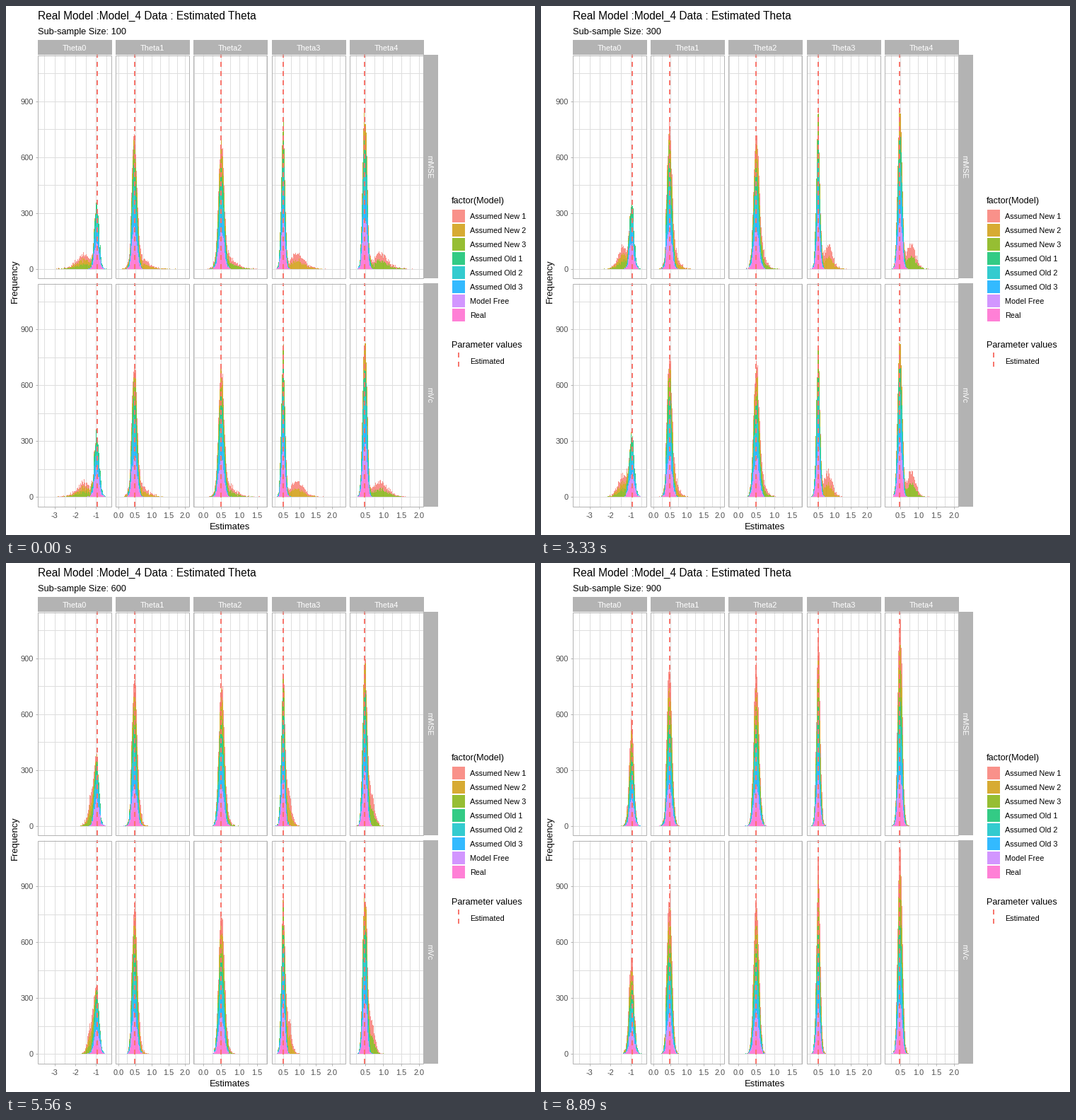
A matplotlib script for the animation above (10 s loop, 748 px wide and 748 px high).

```python
import numpy as np
import matplotlib.pyplot as plt
from matplotlib.animation import FuncAnimation
from matplotlib.patches import Rectangle

rng = np.random.default_rng(7)

SIZE = 748
PX = 0.72  # points per pixel at 100 dpi
GREY, GRID = "#B3B3B3", "#DEDEDE"
HUES = ["#F8766D", "#CD9600", "#7CAE00", "#00BE67",
        "#00BFC4", "#00A9FF", "#C77CFF", "#FF61CC"]
MODELS = ["Assumed New 1", "Assumed New 2", "Assumed New 3", "Assumed Old 1",
          "Assumed Old 2", "Assumed Old 3", "Model Free", "Real"]
SIZES = range(100, 1000, 100)
BIN = 0.02

# Offset and spread of the biased models for each sub-sample size
SHIFT = [0.46, 0.375, 0.32, 0.28, 0.225, 0.175, 0.12, 0.07, 0.025]
SPREAD = [0.20, 0.145, 0.122, 0.107, 0.098, 0.090, 0.080, 0.068, 0.058]

# left, zero, unit: pixels; sds: one per row; biased: models that drift
PANELS = [
    dict(left=45, zero=156.9, unit=29.4, ticks=(-3, -2, -1), step=1, line=129,
         mean=-0.97, sds=(0.113, 0.122), shift=-1.5, spread=1.7, biased=(0, 1, 2)),
    dict(left=155, zero=159, unit=47.2, ticks=(0, 0.5, 1, 1.5, 2), step=0.5, line=182,
         mean=0.48, sds=(0.073, 0.074), shift=0.35, spread=1.1, biased=(0, 1)),
    dict(left=265, zero=279, unit=50.6, ticks=(0, 0.5, 1, 1.5), step=0.5, line=304,
         mean=0.50, sds=(0.075, 0.075), shift=0.35, spread=1.1, biased=(0, 2)),
    dict(left=376, zero=369, unit=46, ticks=(0.5, 1, 1.5, 2), step=0.5, line=392,
         mean=0.50, sds=(0.0565, 0.0565), shift=1, spread=1, biased=(0, 1)),
    dict(left=486, zero=482.6, unit=50.8, ticks=(0.5, 1, 1.5, 2), step=0.5, line=507.5,
         mean=0.49, sds=(0.0565, 0.0565), shift=1, spread=1, biased=(0, 2)),
]
WIDTH, HEIGHT = 104, 316
ROWS = [("mMSE", 69, 371.5), ("mVc", 392, 694)]  # name, top, zero line
COUNT_PX = 79 / 300

fig = plt.figure(figsize=(SIZE / 100, SIZE / 100), dpi=100, facecolor="white")
ax = fig.add_axes([0, 0, 1, 1])
ax.set(xlim=(0, SIZE), ylim=(SIZE, 0), autoscale_on=False)
ax.axis("off")


def text(x, y, s, px, color="black", ha="left", **kw):
    kw.setdefault("va", "baseline")
    return ax.text(x, y, s, fontsize=px * PX, color=color, ha=ha,
                   family="Liberation Sans", zorder=6, **kw)


def box(x, y, w, h, fill="none", edge="none", z=1, **kw):
    ax.add_patch(Rectangle((x, y), w, h, facecolor=fill, edgecolor=edge,
                           lw=PX if edge != "none" else 0, zorder=z, **kw))


def line(xs, ys, color, px=1, z=1, **kw):
    ax.plot(xs, ys, color=color, lw=px * PX, zorder=z,
            solid_capstyle="butt", dash_capstyle="butt", **kw)


def dashed(x, bottom, top):
    line([x, x], [bottom, top], HUES[0], 2, 4, ls=(0, (3.5, 3)))


def draw_panel(p, top, zero):
    left, right, bottom = p["left"], p["left"] + WIDTH, top + HEIGHT
    for count in range(0, 1100, 150):
        y = zero - count * COUNT_PX
        line([left, right], [y, y], GRID)
    half = p["step"] / 2
    first = np.ceil((left - p["zero"]) / p["unit"] / half)
    last = np.floor((right - p["zero"]) / p["unit"] / half)
    for k in np.arange(first, last + 1):
        x = p["zero"] + k * half * p["unit"]
        line([x, x], [top, bottom], GRID)
    dashed(p["line"], bottom, top)
    box(left + 0.5, top + 0.5, WIDTH, HEIGHT - 1, edge=GREY, z=5)


def draw_static():
    text(45, 19, "Real Model :Model_4 Data : Estimated Theta", 15.5)
    text(317, 740, "Estimates", 13, ha="center")
    text(13, 389, "Frequency", 13, ha="center", va="center", rotation=90)

    for i, p in enumerate(PANELS):
        box(p["left"], 48, WIDTH + 1, 21, GREY)
        text(p["left"] + WIDTH / 2, 63, f"Theta{i}", 11, "white", "center")
        for t in p["ticks"]:
            x = p["zero"] + t * p["unit"]
            line([x, x], [708, 711], GREY)
            text(x, 724, f"{t:g}" if i == 0 else f"{t:.1f}", 11, "#4D4D4D", "center")
        for _, top, zero in ROWS:
            draw_panel(p, top, zero)

    for name, top, zero in ROWS:
        box(590, top, 21, HEIGHT, GREY)
        text(598, top + HEIGHT / 2, name, 11, "white", "center",
             va="center", rotation=270)
        for count in range(0, 1000, 300):
            y = zero - count * COUNT_PX
            line([42, 45], [y, y], GREY)
            text(39, y + 4, str(count), 11, "#4D4D4D", "right")

    text(630, 279, "factor(Model)", 12.8)
    for i, (name, hue) in enumerate(zip(MODELS, HUES)):
        y = 297 + 20 * i
        box(631, y - 9, 18, 18, hue, alpha=0.8)
        text(656, y + 4, name, 10.9)
    text(630, 483, "Parameter values", 12.8)
    dashed(640, 510, 490)
    text(656, 506, "Estimated", 10.9)


def bin_edges(p):
    lo = np.ceil((p["left"] + 2 - p["zero"]) / p["unit"] / BIN)
    hi = np.floor((p["left"] + WIDTH - 2 - p["zero"]) / p["unit"] / BIN)
    return (np.arange(lo, hi) + 0.5) * BIN


def make_bars(p):
    xs = p["zero"] + bin_edges(p) * p["unit"]
    flat = np.zeros(len(xs) - 1)
    return [ax.stairs(flat, xs, baseline=flat, fill=True, color=hue, alpha=0.8,
                      lw=0, antialiased=False, zorder=3) for hue in HUES]


def estimates(p, row, model, step):
    sd = p["sds"][row]
    noise = rng.standard_normal(1000)
    if model not in p["biased"]:
        return p["mean"] + sd * noise
    shape = SIZES[step] / 8
    skewed = (rng.standard_gamma(shape, 1000) - shape) / np.sqrt(shape)
    width = max(p["spread"] * SPREAD[step], sd * 1.03)
    return (p["mean"] + p["shift"] * SHIFT[step]
            + np.sign(p["shift"]) * width * skewed)


def stacked_levels(p, row, step):
    """Pixel heights of the stack, from the zero line to the top model."""
    edges = bin_edges(p)
    levels = [np.full(len(edges) - 1, ROWS[row][2])]
    for model in reversed(range(len(MODELS))):
        counts, _ = np.histogram(estimates(p, row, model, step), edges)
        levels.append(levels[-1] - counts * COUNT_PX)
    return levels


draw_static()
subtitle = text(45, 39.5, "", 12.8)
cells = [(r, p) for r in range(len(ROWS)) for p in PANELS]
bars = [make_bars(p) for _, p in cells]
stacks = [[stacked_levels(p, r, step) for r, p in cells]
          for step in range(len(SIZES))]


def update(step):
    subtitle.set_text(f"Sub-sample Size: {SIZES[step]}")
    for patches, levels in zip(bars, stacks[step]):
        for patch, base, top in zip(reversed(patches), levels, levels[1:]):
            patch.set_data(values=top, baseline=base)
    return [subtitle, *(b for group in bars for b in group)]


anim = FuncAnimation(fig, update, frames=len(SIZES), init_func=lambda: update(0),
                     interval=10000 / len(SIZES), repeat=True, repeat_delay=0)
plt.show()
```
